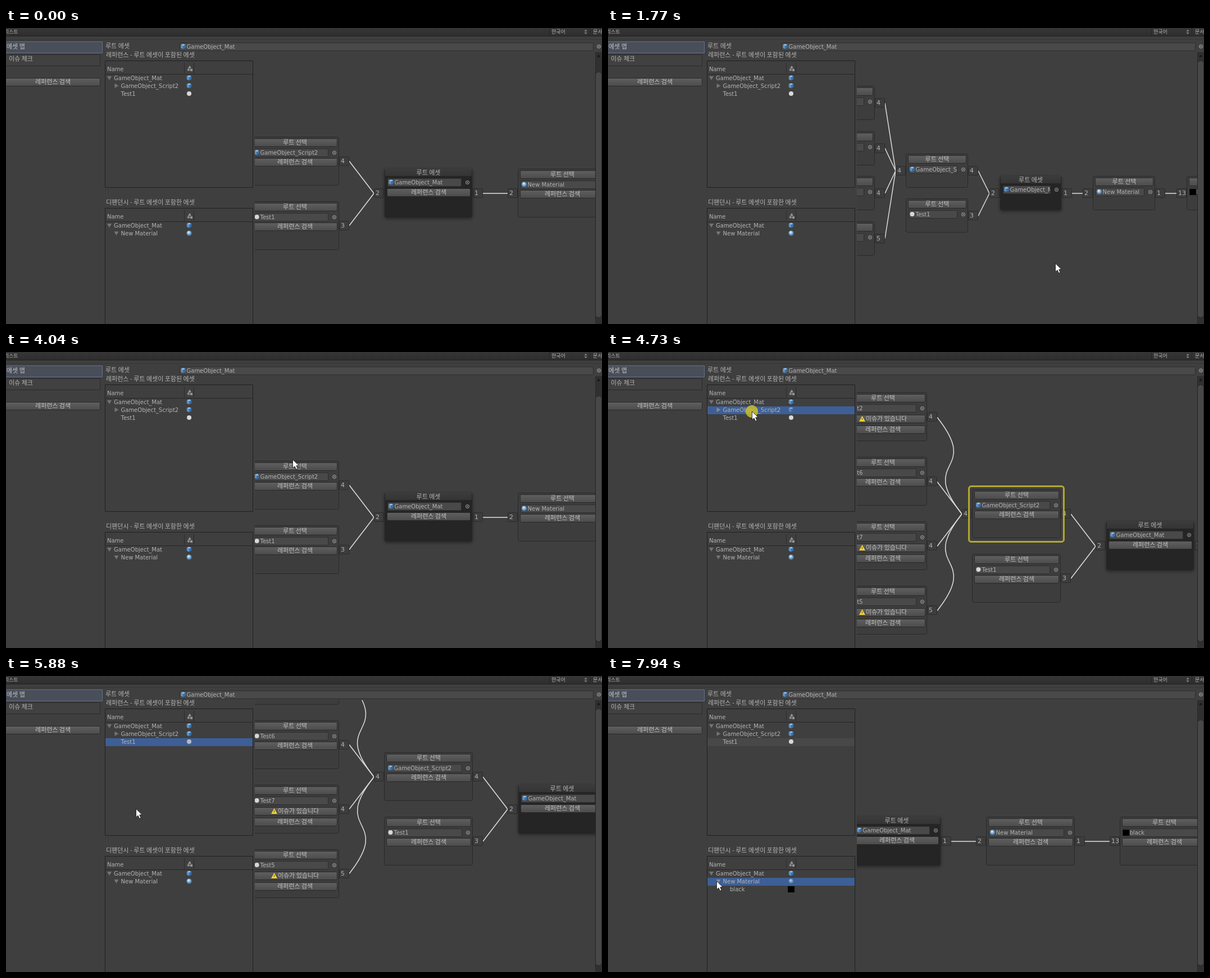
Recreate the animation shown at these times as an HTML page with a canvas. Size 1061 px wide and 528 px high, loop 8000 ms.

```html
<!DOCTYPE html>
<html lang="ko">
<head>
<meta charset="utf-8">
<style>
  html, body { margin: 0; width: 100%; height: 100%; overflow: hidden; background: #3f3f3f; }
  canvas { display: block; }
</style>
</head>
<body>
<canvas id="stage" width="1061" height="528"></canvas>
<script>
const ctx = document.getElementById('stage').getContext('2d');
const W = 1061, H = 528, LOOP = 8000;
const LATIN = '10px "DejaVu Sans", sans-serif';
const DIGIT = '11px "DejaVu Sans", sans-serif';
const HANGUL = '11px "Noto Sans CJK KR", "Noto Sans CJK", sans-serif';
const SMALL = HANGUL.replace('11px', '9px');
const INK = '#b4b4b4', BG = '#3f3f3f', EDGE = '#292929';

// Graph: column and row are in grid units around the root asset.
const CENTER = { x: 752, y: 294.5 }, GRID = { x: 238, y: 115 };
const NODE = { w: 158, h: 87 }, PORT = { w: 18, h: 17 };
const nodes = [
  { name: 'Test2', col: -2, row: -2, icon: 'scene', out: 4, warn: true },
  { name: 'Test6', col: -2, row: -1, icon: 'scene', out: 4 },
  { name: 'Test7', col: -2, row: 0, icon: 'scene', out: 4, warn: true },
  { name: 'Test5', col: -2, row: 1, icon: 'scene', out: 5, warn: true },
  { name: 'GameObject_Script2', col: -1, row: -.5, icon: 'cube', in: 4, out: 4 },
  { name: 'Test1', col: -1, row: .5, icon: 'scene', out: 3 },
  { name: 'GameObject_Mat', col: 0, row: 0, icon: 'cube', in: 2, out: 1, root: true },
  { name: 'New Material', col: 1, row: 0, icon: 'ball', in: 2, out: 1 },
  { name: 'black', col: 2, row: 0, icon: 'black', in: 13 }
];
const links = [[0, 4], [1, 4], [2, 4], [3, 4], [4, 6], [5, 6], [6, 7], [7, 8]];

const zooms = [[0, 1], [1770, .7], [1860, .6], [2560, .8], [2630, 1]];
const focuses = [
  { at: 4640, node: nodes[4], tau: 40, life: 480 },
  { at: 5430, node: nodes[5], tau: 8, life: 150 },
  { at: 6400, node: nodes[7], tau: 40, life: 480 }
];
const presses = [[4640, 4800], [5430, 5580], [6400, 6700], [7090, 7180], [7690, 7800]];
const pointer = [
  [220, 1011, 436], [500, 880, 425], [760, 785, 411], [910, 796, 420], [3030, 796, 420],
  [3120, 807, 421], [3580, 807, 421], [3660, 868, 420], [4040, 510, 192], [4340, 249, 88],
  [4430, 249, 88], [4490, 256, 106], [5050, 256, 106], [5300, 236, 121], [5730, 236, 121],
  [6030, 226, 352], [6180, 226, 352], [6400, 204, 364], [6630, 204, 364], [6880, 196, 361],
  [7330, 196, 361], [7420, 201, 367], [7570, 201, 367], [7700, 196, 366], [7880, 196, 366],
  [7940, 193, 366]
];

function text(str, x, cy, font = LATIN, align = 'left', color = INK) {
  ctx.font = font;
  ctx.textAlign = align;
  ctx.fillStyle = color;
  ctx.fillText(str, x, cy + 4);
}

function rect(x, y, w, h, color) {
  ctx.fillStyle = color;
  ctx.fillRect(x, y, w, h);
}

function box(x, y, w, h, fill, edge = EDGE, r = 0) {
  ctx.beginPath();
  ctx.roundRect(x + .5, y + .5, w - 1, h - 1, r);
  if (fill) { ctx.fillStyle = fill; ctx.fill(); }
  ctx.strokeStyle = edge;
  ctx.lineWidth = 1;
  ctx.stroke();
}

function shade(y, h, top, bottom) {
  const g = ctx.createLinearGradient(0, y, 0, y + h);
  g.addColorStop(0, top);
  g.addColorStop(1, bottom);
  return g;
}

function poly(points, color) {
  ctx.beginPath();
  points.forEach(([x, y]) => ctx.lineTo(x, y));
  ctx.closePath();
  ctx.fillStyle = color;
  ctx.fill();
}

function disc(x, y, r, color) {
  ctx.beginPath();
  ctx.arc(x, y, r, 0, Math.PI * 2);
  ctx.fillStyle = color;
  ctx.fill();
}

function button(x, cy, w, label, warn) {
  box(x, cy - 7, w, 15, shade(cy - 7, 15, '#606060', '#4b4b4b'), EDGE, 2);
  const mid = x + w / 2;
  text(label, mid + (warn ? 6 : 0), cy, HANGUL, 'center', '#c0c0c0');
  if (warn) {
    const tx = mid - 37;
    poly([[tx, cy - 5], [tx + 5.5, cy + 5], [tx - 5.5, cy + 5]], '#f0d030');
    rect(tx - .5, cy - 1, 1, 3, '#4a4420');
  }
}

const icons = {
  cube(x, y) {
    poly([[x, y - 4.5], [x + 4.2, y - 3], [x, y - 1], [x - 4.2, y - 3]], '#98c4e8');
    poly([[x - 4.2, y - 3], [x, y - 1], [x, y + 4.5], [x - 4.2, y + 2.5]], '#5794d0');
    poly([[x + 4.2, y - 3], [x, y - 1], [x, y + 4.5], [x + 4.2, y + 2.5]], '#376fae');
  },
  ball(x, y) {
    const g = ctx.createRadialGradient(x - 1, y - 2, .5, x, y, 5.2);
    g.addColorStop(0, '#e4f1fa');
    g.addColorStop(.5, '#7fabcf');
    g.addColorStop(1, '#2f5f8c');
    disc(x, y, 4.8, g);
  },
  scene(x, y) { disc(x, y, 4, '#d8d8d8'); },
  black(x, y) { rect(x - 6, y - 5, 12, 11, '#000'); }
};

function picker(x, y) {
  ctx.beginPath();
  ctx.arc(x, y, 3, 0, Math.PI * 2);
  ctx.strokeStyle = '#b0b0b0';
  ctx.lineWidth = 1;
  ctx.stroke();
  disc(x, y, 1, '#b0b0b0');
}

function field(x, cy, w, name, icon) {
  box(x, cy - 7, w, 15, '#494949', '#2d2d2d', 1);
  ctx.save();
  ctx.beginPath();
  ctx.rect(x, cy - 8, w - 1, 16);
  ctx.clip();
  icons[icon](x + 6.5, cy);
  text(name, x + 12.5, cy);
  ctx.restore();
}

function valueAt(steps, t) {
  return steps.filter(s => t >= s[0]).pop()[1];
}

function viewAt(t) {
  let x = 0, y = 0;
  for (const f of focuses) {
    if (t < f.at) break;
    const k = Math.exp(-(t - f.at) / f.tau);
    const tx = f.node.col * GRID.x, ty = f.node.row * GRID.y;
    x = tx + (x - tx) * k;
    y = ty + (y - ty) * k;
  }
  return { x, y, zoom: valueAt(zooms, t) };
}

function place(n, view) {
  const w = NODE.w * view.zoom, h = NODE.h * view.zoom;
  const cx = CENTER.x + (n.col * GRID.x - view.x) * view.zoom;
  const cy = CENTER.y + (n.row * GRID.y - view.y) * view.zoom;
  const x = Math.round(cx - w / 2), y = Math.round(cy - h / 2);
  return { x, y, w: Math.round(w), h: Math.round(h), cy };
}

function drawLink(a, b, zoom) {
  const x1 = a.x + a.w + PORT.w, x2 = b.x - PORT.w;
  const y1 = a.cy + .5, y2 = b.cy + .5, dy = y2 - y1;
  ctx.beginPath();
  ctx.moveTo(x1, y1);
  if (zoom === 1 && Math.abs(dy) > 150) {
    const bend = Math.sign(dy) * 100;
    ctx.bezierCurveTo(x1 + 79, y1 + bend, x2 - 79, y2 - bend, x2, y2);
  } else {
    ctx.lineTo(x2, y2);
  }
  ctx.strokeStyle = '#e0e0e0';
  ctx.lineWidth = 1.5;
  ctx.stroke();
}

function drawPort(x, cy, count) {
  if (!count) return;
  const y = Math.round(cy - PORT.h / 2);
  box(x, y, PORT.w, PORT.h, '#3d3d3d', '#2b2b2b', 1);
  text(count, x + 3, y + 8, DIGIT);
}

function drawRoot(x, y, w, h) {
  ctx.save();
  ctx.shadowColor = 'rgba(0,0,0,.45)';
  ctx.shadowBlur = 6;
  ctx.shadowOffsetY = 2;
  ctx.beginPath();
  ctx.roundRect(x, y, w, h, 3);
  ctx.fillStyle = '#252525';
  ctx.fill();
  ctx.restore();
  rect(x + 1, y, w - 2, 13, shade(y, 13, '#3c3c3c', '#343434'));
  text('루트 에셋', x + w / 2, y + 7, HANGUL, 'center');
}

function drawNode(n, p, full) {
  drawPort(p.x - PORT.w, p.cy, n.in);
  drawPort(p.x + p.w, p.cy, n.out);
  const inset = n.root ? 1 : 0;
  const x = p.x + inset, w = p.w - 2 * inset, { y, h } = p;
  const fy = y + (n.root ? 24 : 28);
  if (n.root) {
    drawRoot(x, y, w, h);
  } else {
    box(x, y, w, h, '#3d3d3d', EDGE, 3);
    button(x + 4, y + 10, w - 7, '루트 선택');
  }
  field(x + 5, fy, w - 24, n.name, n.icon);
  picker(x + w - 8.5, fy + .5);
  if (!full) return;
  if (n.warn) button(x + 4, y + 47, w - 7, '이슈가 있습니다', true);
  button(x + 4, y + (n.warn ? 66 : n.root ? 42 : 45), w - 7, '레퍼런스 검색');
}

function drawPing(t, view) {
  const f = focuses.filter(f => t >= f.at && t < f.at + f.life).pop();
  if (!f) return;
  const age = (t - f.at) / f.life, p = place(f.node, view);
  const m = 3 + 9 * Math.exp(-age * 6);
  ctx.globalAlpha = Math.min(1, (1 - age) * 2.5);
  ctx.beginPath();
  ctx.roundRect(p.x - m + .5, p.y - m + .5, p.w + 2 * m - 1, p.h + 2 * m, 4);
  ctx.strokeStyle = '#b3a92f';
  ctx.lineWidth = 3;
  ctx.stroke();
  ctx.globalAlpha = 1;
}

function drawGraph(t) {
  const view = viewAt(t), full = view.zoom === 1;
  const spots = nodes.map(n => place(n, view));
  ctx.save();
  ctx.beginPath();
  ctx.rect(443, 43, 606, H - 43);
  ctx.clip();
  links.forEach(([a, b]) => drawLink(spots[a], spots[b], view.zoom));
  nodes.forEach((n, i) => drawNode(n, spots[i], full));
  drawPing(t, view);
  ctx.restore();

  const top = full && view.y > -40 && (t < 5430 || t > 6400) ? 79 : 59;
  rect(1049, 43, 12, H - 43, '#303030');
  rect(1049, 43, 1, H - 43, '#292929');
  poly([[1055, 47], [1058, 52], [1052, 52]], '#191919');
  box(1049, top - 1, 12, 518 - top, '#484848', '#242424', 5);
}

function drawRow(y, [name, depth, arrow, icon], fill) {
  if (fill) rect(177, y - 6, 262, 14, fill);
  const ax = 184 + depth * 12.5, color = fill ? '#7f8ba0' : '#747474';
  if (arrow === 'down') poly([[ax - 4, y - 3], [ax + 4, y - 3], [ax, y + 4]], color);
  if (arrow === 'right') poly([[ax - 3, y - 4], [ax + 4, y], [ax - 3, y + 4]], color);
  text(name, 192 + depth * 12.5, y);
  ctx.globalAlpha = fill === '#3e5f96' ? .75 : 1;
  icons[icon](326, y);
  ctx.globalAlpha = 1;
}

function drawList(y, h, title, rows, selected, fill) {
  text(title, 178, y - 10, HANGUL);
  box(176, y, 264, h, BG, '#202020');
  text('Name', 180, y + 15);
  rect(317, y + 4, 1, 19, '#2c2c2c');
  rect(334, y + 4, 1, 19, '#2c2c2c');
  rect(177, y + 24, 262, 1, '#272727');
  poly([[327, y + 9], [330, y + 14], [324, y + 14]], '#959595');
  disc(325, y + 16.5, 2.3, '#8a8a8a');
  rect(328, y + 15, 4, 4, '#959595');
  rows.forEach((row, i) => drawRow(y + 31 + i * 14, row, i === selected && fill));
}

function drawLists(t) {
  const blue = '#3e5f96', moved = t >= 6400;
  const upper = [
    ['GameObject_Mat', 0, 'down', 'cube'],
    ['GameObject_Script2', 1, 'right', 'cube'],
    ['Test1', 1, '', 'scene']
  ];
  const lower = [
    ['GameObject_Mat', 0, 'down', 'cube'],
    ['New Material', 1, 'down', 'ball']
  ];
  if (t >= 7750) lower.push(['black', 2, '', 'black']);
  const pick = t < 4640 ? -1 : t < 5430 ? 1 : 2;
  drawList(58, 227, '레퍼런스 - 루트 에셋이 포함된 에셋', upper, pick, moved ? '#484848' : blue);
  drawList(321, 220, '디팬던시 - 루트 에셋이 포함한 에셋', lower, moved ? 1 : -1, blue);
}

function drawFrame() {
  rect(0, 0, W, H, BG);
  rect(0, 0, W, 14, shade(0, 14, '#363636', '#2e2e2e'));
  rect(0, 14, W, 1, '#222');
  rect(0, 20, W, 1, '#363636');
  text('리스트', 21.5, 6, SMALL, 'right');
  rect(967, 0, 1, 14, '#262626');
  rect(1039, 0, 1, 14, '#262626');
  text('한국어', 971, 6, SMALL);
  poly([[1032, 3], [1034.5, 6], [1029.5, 6]], '#8d8d8d');
  poly([[1032, 11], [1034.5, 8], [1029.5, 8]], '#8d8d8d');
  text('문서', 1045, 6, SMALL);

  box(-2, 24, 174, 21, '#494e58', '#61728d');
  text('에셋 맵', 1, 33, HANGUL, 'left', '#c4c4c4');
  box(-2, 47, 170, 21, '#414141', EDGE);
  text('이슈 체크', 5, 55, HANGUL);
  button(-1, 96, 169, '레퍼런스 검색');

  text('루트 에셋', 177, 32, HANGUL);
  field(309, 33, 737, 'GameObject_Mat', 'cube');
  picker(1055.5, 33);
}

function drawPointer(t) {
  if (t < pointer[0][0]) return;
  const i = pointer.findIndex(p => p[0] > t);
  const b = pointer[i < 0 ? pointer.length - 1 : i];
  const a = i < 0 ? b : pointer[i - 1];
  const k = a === b ? 0 : (t - a[0]) / (b[0] - a[0]);
  const x = Math.round(a[1] + (b[1] - a[1]) * k);
  const y = Math.round(a[2] + (b[2] - a[2]) * k);
  if (presses.some(([from, to]) => t >= from && t < to)) disc(x, y, 11, 'rgba(200,190,45,.85)');
  const px = x + .5;
  poly([[px, y], [px, y + 15], [px + 3.5, y + 11.8], [px + 6, y + 17.3], [px + 8.6, y + 16.1],
    [px + 6.2, y + 10.8], [px + 10.7, y + 10.6]], '#fff');
  ctx.strokeStyle = '#111';
  ctx.lineWidth = .8;
  ctx.stroke();
}

function draw(now) {
  const t = now % LOOP;
  drawFrame();
  drawGraph(t);
  drawLists(t);
  drawPointer(t);
}

let start;
function tick(now) {
  start ??= now;
  draw(now - start);
  requestAnimationFrame(tick);
}
draw(0);
requestAnimationFrame(tick);
</script>
</body>
</html>
```
